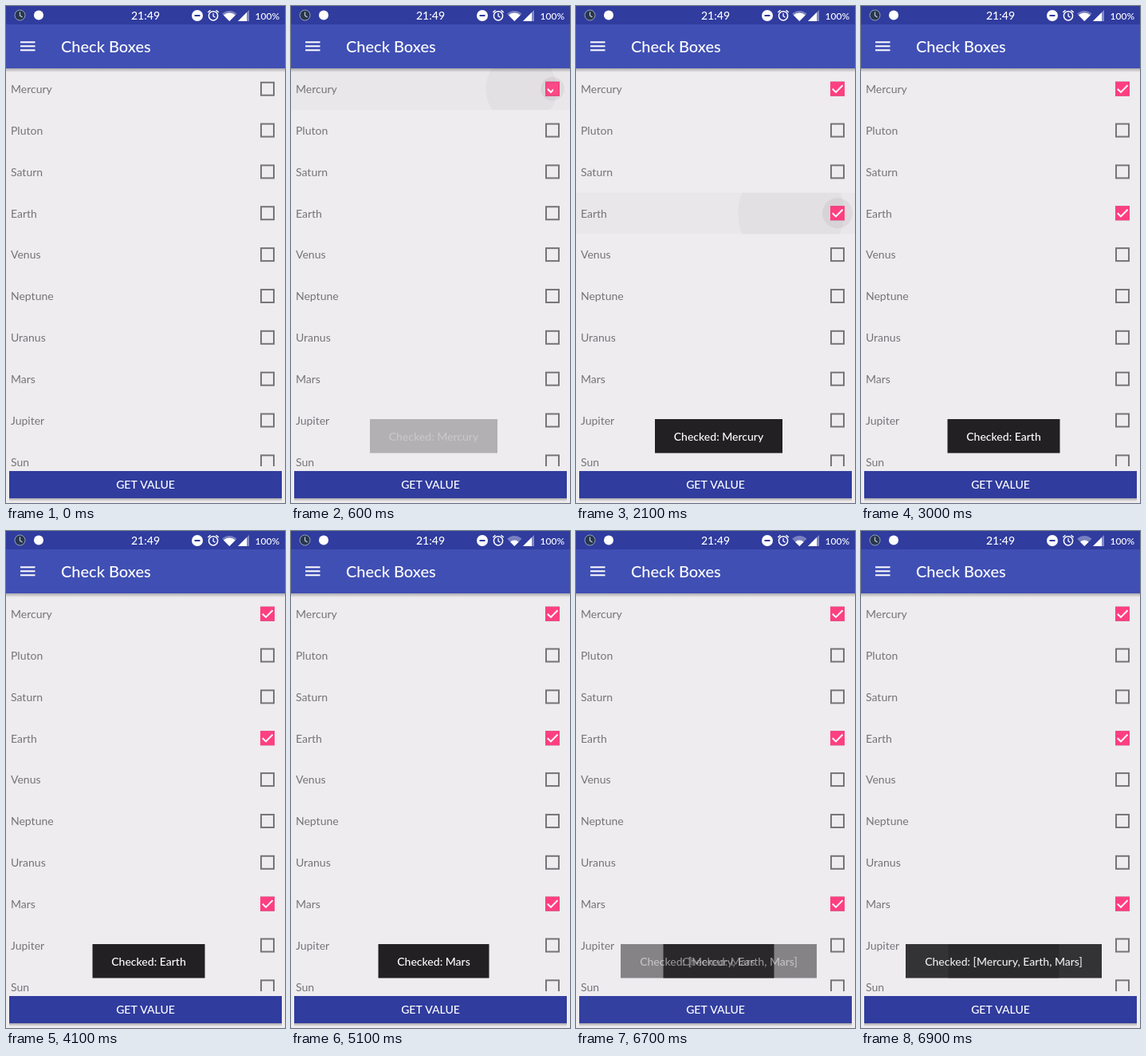
These frames come from a looping animation (350 by 622 pixels, 8000 ms). An HTML page with a canvas:

```html
<!DOCTYPE html>
<html lang="en">
<head>
<meta charset="utf-8">
<title>Check Boxes</title>
<style>
  html, body { margin: 0; width: 100%; height: 100%; overflow: hidden; background: #eeecef; }
  canvas { display: block; width: 350px; height: 622px; }
</style>
</head>
<body>
<canvas id="stage" width="350" height="622"></canvas>
<script>
const ctx = document.getElementById('stage').getContext('2d');
const LOOP = 8000, LAST_CHANGE = 6900, ROW = 51.85;
const GREY = '#757477', PINK = '#ff3f80', DARK = '#303c9e', BLUE = '#404fb4', PAPER = '#eeecef';
const planets = ['Mercury', 'Pluton', 'Saturn', 'Earth', 'Venus', 'Neptune', 'Uranus', 'Mars', 'Jupiter', 'Sun'];
const taps = [
  { row: 0, at: 500, wide: true },
  { row: 3, at: 1900, wide: true },
  { row: 7, at: 3700, wide: false }
];
const toasts = [
  { at: 520, text: 'Mercury' },
  { at: 2500, text: 'Earth' },
  { at: 4550, text: 'Mars' },
  { at: 6550, text: '[Mercury, Earth, Mars]' }
];

const ramp = (t, from, to) => Math.min(1, Math.max(0, (t - from) / (to - from)));

function rect(color, x, y, w, h) {
  ctx.fillStyle = color;
  ctx.fillRect(x, y, w, h);
}

function disc(color, x, y, r) {
  ctx.fillStyle = color;
  ctx.beginPath();
  ctx.arc(x, y, r, 0, 7);
  ctx.fill();
}

function line(color, width, points) {
  ctx.strokeStyle = color;
  ctx.lineWidth = width;
  ctx.beginPath();
  points.forEach(([x, y]) => ctx.lineTo(x, y));
  ctx.stroke();
}

function ring(color, width, x, y, r) {
  ctx.strokeStyle = color;
  ctx.lineWidth = width;
  ctx.beginPath();
  ctx.arc(x, y, r, 0, 7);
  ctx.stroke();
}

function label(text, x, y, size, color = '#fff', weight = 500, align = 'left') {
  ctx.font = `${weight} ${size}px Lato, sans-serif`;
  ctx.textAlign = align;
  ctx.fillStyle = color;
  ctx.fillText(text, x, y);
}

function clipped(x, y, w, h, draw) {
  ctx.save();
  ctx.beginPath();
  ctx.rect(x, y, w, h);
  ctx.clip();
  draw();
  ctx.restore();
}

function shadow(y, h, alpha, x = 0, w = 350) {
  const g = ctx.createLinearGradient(0, y, 0, y + h);
  g.addColorStop(0, `rgba(0,0,0,${alpha})`);
  g.addColorStop(1, 'rgba(0,0,0,0)');
  rect(g, x, y, w, h);
}

function fan(color, r) {
  ctx.fillStyle = color;
  ctx.beginPath();
  ctx.moveTo(280.3, 19);
  ctx.arc(280.3, 19, r, -Math.PI * 0.75, -Math.PI * 0.25);
  ctx.fill();
}

function triangle(color, x, size) {
  ctx.fillStyle = color;
  ctx.beginPath();
  ctx.moveTo(x, 19);
  ctx.lineTo(x + size, 19);
  ctx.lineTo(x + size, 19 - size);
  ctx.fill();
}

function header(t) {
  shadow(78, 5, 0.28);
  rect(BLUE, 0, 23, 350, 55);
  rect(DARK, 0, 0, 350, 23);

  disc('#29364f', 17.5, 11.5, 6.5);
  ring('#93a4b4', 1, 17.5, 11.5, 6.5);
  line('#c3ced6', 1.2, [[17.5, 7.5], [17.5, 12], [20.5, 14]]);
  disc('#fff', 41, 11.5, 6);
  label('21:49', 175, 17, 14, '#fff', 500, 'center');

  disc('#fff', 240, 12, 7);
  rect(DARK, 236.5, 11, 7, 2);
  ring('#fff', 1.5, 260, 12.3, 5.6);
  line('#fff', 1.3, [[260, 9], [260, 12.6], [262.5, 14.2]]);
  line('#fff', 1.5, [[253.3, 8], [256.5, 5.3]]);
  line('#fff', 1.5, [[266.7, 8], [263.5, 5.3]]);
  fan('rgba(255,255,255,.35)', 13);
  fan('#fff', t < 4500 ? 10.5 : 7.5);
  triangle('rgba(255,255,255,.4)', 291, 14);
  triangle('#fff', 291, 11);
  label('100%', 312.5, 16.5, 12);

  for (const y of [44, 49, 54]) rect('#fff', 18, y + 0.3, 18.5, 2);
  label('Check Boxes', 69, 58, 20);
}

function rowRipple(age, y) {
  const wash = 0.018 * ramp(age, 0, 100) * (1 - ramp(age, 200, 380));
  const spread = 0.5 * (1 - Math.exp(-age / 140));
  const alpha = 0.03 * ramp(age, 0, 80) * (1 - 0.65 * ramp(age, 220, 400)) * (1 - ramp(age, 400, 650));
  clipped(0, y - 26, 350, 52, () => {
    rect(`rgba(0,20,0,${wash})`, 0, y - 26, 350, 52);
    disc(`rgba(0,0,0,${alpha})`, 328 - 153 * spread, y, 175 * spread);
  });
}

function checkBox(y, checked) {
  ctx.strokeStyle = GREY;
  ctx.lineWidth = 2;
  ctx.strokeRect(320, y - 8, 16, 16);
  if (!checked) return;
  ctx.globalAlpha = ramp(checked, 0, 0.6);
  rect(PINK, 319, y - 9, 18, 18);
  ctx.globalAlpha = 1;
  clipped(319, y - 9, 18 * checked, 18, () =>
    line('#fff', 2, [[321.8, y], [326, y + 4.2], [334.5, y - 4.5]]));
}

function list(t) {
  clipped(0, 78, 350, 498, () => planets.forEach((name, i) => {
    const y = 103.7 + ROW * i;
    const tap = taps.find(p => p.row === i);
    const age = tap ? t - tap.at : -1;
    if (age >= 0) {
      if (tap.wide) rowRipple(age, y + 0.3);
      const alpha = 0.06 * ramp(age, -50, 100) * (1 - ramp(age, 200, 400));
      disc(`rgba(60,0,30,${alpha})`, 328, y, 19 * ramp(age, -80, 150));
    }
    label(name, 6, y + 5.3, 14, GREY, 400);
    checkBox(y, ramp(age, 0, 180));
  }));
}

function button(t) {
  shadow(616, 4, 0.3, 4, 342);
  rect(DARK, 4, 582, 342, 34);
  const age = t - 5950;
  const alpha = 0.045 * ramp(age, 0, 120) * (1 - ramp(age, 560, 880));
  clipped(4, 582, 342, 34, () => disc(`rgba(255,255,255,${alpha})`, 175, 599, 180 * ramp(age, 0, 400)));
  label('GET VALUE', 175, 604, 14, '#fff', 500, 'center');
}

function toast({ at, text }, i, t) {
  const shown = ramp(t, at, at + 500);
  const next = toasts[i + 1];
  const gone = next ? ramp(t, next.at, next.at + 500) : 0;
  if (!shown || gone === 1) return;
  const message = 'Checked: ' + text;
  ctx.font = '500 14px Lato, sans-serif';
  const width = Math.round(ctx.measureText(message).width + 48);
  ctx.globalAlpha = (1 - (1 - shown) ** 2) * (1 - gone ** 2);
  rect('#222023', 179 - width / 2, 517, width, 42.5);
  label(message, 179, 544, 14, '#fff', 500, 'center');
  ctx.globalAlpha = 1;
}

function render(now) {
  const t = Math.min(LAST_CHANGE, Math.floor((now % LOOP) / 100) * 100);
  rect(PAPER, 0, 0, 350, 622);
  list(t);
  header(t);
  button(t);
  toasts.forEach((item, i) => toast(item, i, t));
}

const start = performance.now();
function tick() {
  render(performance.now() - start);
  requestAnimationFrame(tick);
}
tick();
</script>
</body>
</html>
```
